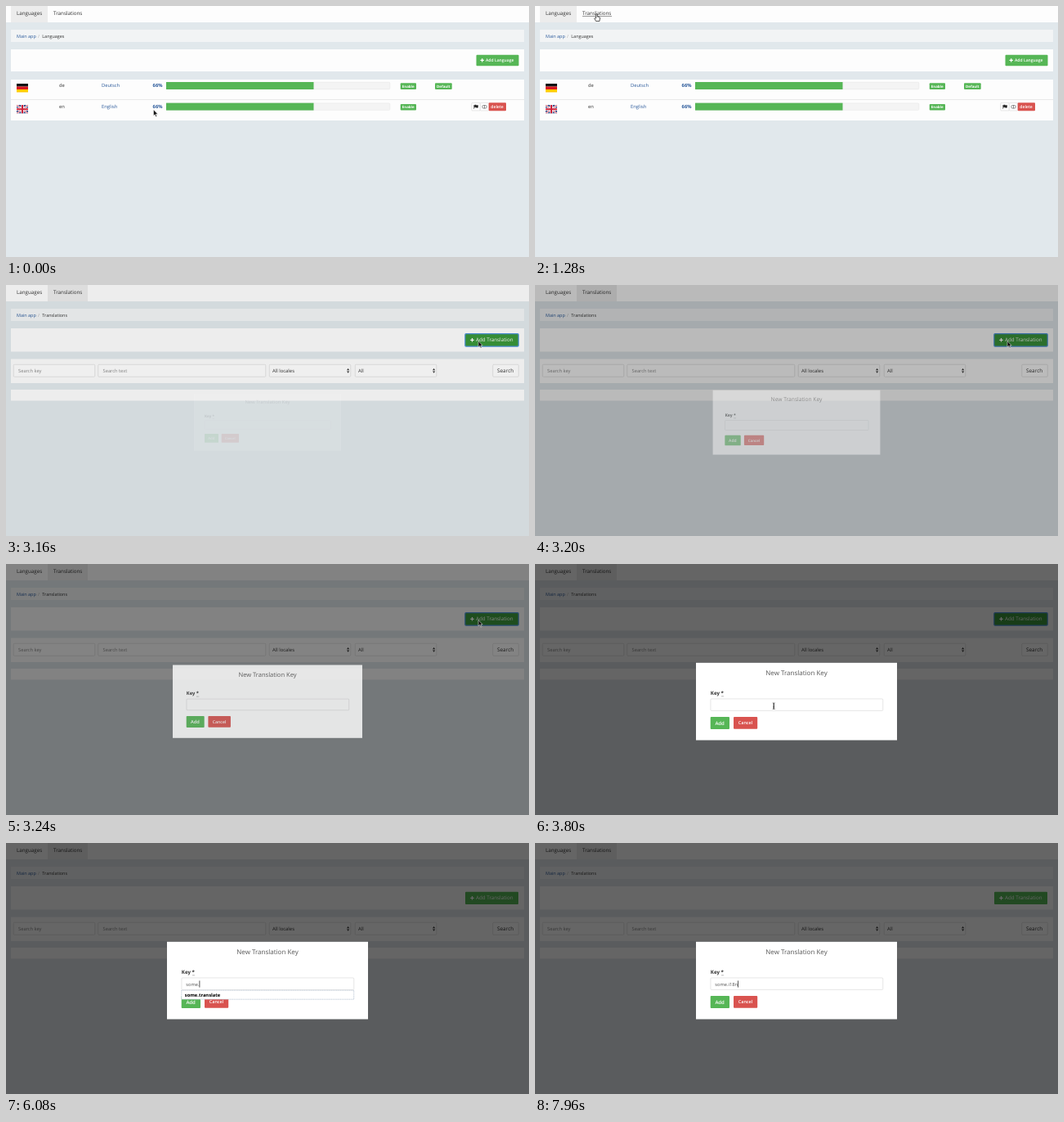
Animation of 640 by 307 pixels, one loop 8000 ms. Source, as an HTML page:

```html
<!DOCTYPE html>
<html lang="en">
<head>
<meta charset="utf-8">
<title>Translation manager</title>
<style>
  html, body { margin: 0; width: 100%; height: 100%; overflow: hidden; background: #e1e8ec; }
  svg { display: block; width: 100%; height: 100%; }
  text { font-family: "Open Sans", sans-serif; text-rendering: geometricPrecision; white-space: pre; }
</style>
</head>
<body>
<svg id="stage" viewBox="0 0 640 307"></svg>
<script>
const LOOP = 8000;
const GREEN = '#56b656', RED = '#d9534f', LINK = '#2b5a9b', INK = '#333';

// Markup helpers
const rect = (x, y, w, h, fill, extra = '') =>
  `<rect x="${x}" y="${y}" width="${w}" height="${h}" fill="${fill}" ${extra}/>`;
const text = (x, y, size, value, fill = INK, weight = 400, extra = '') =>
  `<text x="${x}" y="${y}" font-size="${size}" fill="${fill}" font-weight="${weight}" ${extra}>${value}</text>`;
const path = (d, fill, extra = '') => `<path d="${d}" fill="${fill}" ${extra}/>`;
const group = (id, content, extra = '') => `<g id="${id}" ${extra}>${content}</g>`;
const box = (x, y, w, h, fill = '#fff', border = '#ccc') =>
  rect(x + .25, y + .25, w - .5, h - .5, fill, `rx="1" stroke="${border}" stroke-width=".5"`);
const panel = (y, h, fill = '#fdfdfd') => rect(6, y, 628, h, fill);
const plus = (x, y) => path(`M${x} ${y}h4.4M${x + 2.2} ${y - 2.2}v4.4`, 'none', 'stroke="#fff" stroke-width="1.3"');

function header(activeX, activeWidth, title) {
  return rect(0, 0, 640, 20, '#fdfdfd') +
    rect(activeX, 0, activeWidth, 20, '#ececec') +
    text(13, 11.2, 6.25, 'Languages') +
    text(58, 11.2, 6.25, 'Translations') +
    panel(29, 15, '#f2f4f5') +
    text(13, 38.5, 5.45, 'Main app', LINK) +
    text(39, 38.5, 5.45, '/', '#aaa') +
    text(44.3, 38.5, 5.45, title);
}

const germanFlag = ['#111', '#d8171e', '#fc0']
  .map((color, i) => rect(13, 95 + i * 3.5, 14, 3.5, color)).join('');

const britishFlag = `<svg x="13" y="121" width="14" height="10.5" viewBox="0 0 14 10.5">` +
  rect(0, 0, 14, 10.5, '#1f3a7d') +
  path('M0 0L14 10.5M14 0L0 10.5', 'none', 'stroke="#fff" stroke-width="2.2"') +
  path('M0 0L14 10.5M14 0L0 10.5', 'none', 'stroke="#cf2138" stroke-width=".8"') +
  path('M7 0V10.5M0 5.25H14', 'none', 'stroke="#fff" stroke-width="3.4"') +
  path('M7 0V10.5M0 5.25H14', 'none', 'stroke="#cf2138" stroke-width="2"') + '</svg>';

const badge = (x, y, w, label) =>
  rect(x, y, w, 7.6, GREEN, 'rx="1"') + text(x + 2.1, y + 5.4, 4.4, label, '#fff', 700);

function languageRow(y, code, name) {
  return text(65, y + 6.2, 5.8, code) +
    text(117, y + 6.2, 5.8, name, LINK) +
    text(179.6, y + 6.2, 5.8, '66%', LINK, 700) +
    box(196, y, 274, 9, '#f4f4f4', '#e2e2e2') +
    rect(196, y, 180.5, 9, GREEN) +
    badge(482.7, y + 1.3, 19.3, 'Enable');
}

const rowActions = box(569.5, 118.2, 11, 10) + box(580, 118.2, 11, 10) +
  path('M572.6 121v5M573.2 121.3q1.3-.7 2.3 0t2 0v2.8q-1 .7-2 0t-2.3 0z', '#222', 'stroke="#222" stroke-width=".5"') +
  rect(582.9, 121.5, 5.2, 3.6, 'none', 'rx="1.4" stroke="#444" stroke-width=".6"') +
  path('M585.5 121.5v3.6', 'none', 'stroke="#444" stroke-width=".6"') +
  rect(590.7, 118.2, 21.3, 10, RED, 'rx="1"') +
  text(593.3, 125, 5.1, 'delete', '#fff', 600);

const languagesPage = header(6, 45, 'Languages') +
  group('tabUnderline', rect(58, 12.3, 36, .5, INK)) +
  panel(53, 27) +
  rect(575.5, 59.7, 52, 13.5, GREEN, 'rx="1"') + plus(580.5, 66.4) +
  text(587, 68.4, 5.05, 'Add Language', '#fff', 600) +
  panel(90, 50) + rect(6, 114.2, 628, .6, '#ddd') +
  germanFlag + languageRow(93, 'de', 'Deutsch') + badge(525, 94.3, 20.7, 'Default') +
  britishFlag + languageRow(118.6, 'en', 'English') + rowActions;

const select = (x, label) => box(x, 97, 100, 15.5) + text(x + 4, 107.2, 5.9, label) +
  path(`M${x + 95} 104.2h3.2l-1.6-2.3zM${x + 95} 105.4h3.2l-1.6 2.3z`, INK);
const field = (x, w, label) => box(x, 97, w, 15.5) + text(x + 6, 107.2, 5.75, label, '#888');

const translationsPage = header(51, 49, 'Translations') +
  panel(53, 28.5) +
  rect(562, 59.8, 65, 15.2, GREEN, 'id="addButton" rx="1"') +
  rect(561.8, 59.6, 65.4, 15.6, 'none', 'id="focusRing" rx="1.2" stroke="#4f94dc" stroke-width="1.2"') +
  plus(568.3, 67.3) + text(575, 69.4, 6.25, 'Add Translation', '#fff') +
  panel(90.5, 29.5) +
  field(9, 100, 'Search key') + field(112.5, 205.5, 'Search text') +
  select(322, 'All locales') + select(427, 'All') +
  box(595.5, 97, 32, 15.5) + text(601, 107.2, 6.4, 'Search') +
  panel(128, 13.5);

const modal = rect(197, 120.8, 246, 94.7, '#fff') +
  text(320, 136.3, 8, 'New Translation Key', '#555', 400, 'text-anchor="middle"') +
  text(214.8, 160, 6.2, 'Key *', INK, 700) +
  path('M228 161.8h3.3', 'none', 'stroke="#555" stroke-width=".6" stroke-dasharray=".7 .5"') +
  box(214.7, 164.7, 211.3, 15, '#fff', '#ccc') +
  rect(214.7, 187, 23.3, 15, GREEN, 'rx="1"') + text(220.4, 196.6, 6, 'Add', '#fff', 600) +
  rect(243, 187, 29.2, 14.7, RED, 'rx="1"') + text(248.8, 196.3, 5.45, 'Cancel', '#fff', 600) +
  text(220.3, 174.6, 5.7, '', '#555', 400, 'id="entry"') +
  rect(0, 168.4, .7, 8.2, '#111', 'id="caret"') +
  group('suggestion',
    rect(214.8, 180.2, 210.9, 11, '#fff', 'stroke="#9fb0c4" stroke-width=".6" stroke-dasharray="1.5 .7"') +
    text(218.8, 188, 5.75, 'some.translate', '#000', 700));

const outline = 'stroke="#fff" stroke-width=".5"';
const cursors =
  group('arrow', path('M0 0V7.4L1.7 5.9 2.9 8.6 4.1 8.1 2.9 5.5H5.2Z', '#111', outline)) +
  group('hand', path('M-.8 0Q0-.8 .8 0V3L3 3.4Q4.2 3.7 4 5L3.4 8.6H-.9L-2.8 5.2Q-2.4 4.2-.8 5Z', '#fff', 'stroke="#111" stroke-width=".7"')) +
  group('beam', path('M-1.3-3.8Q0-3.8 0-3V3Q0 3.8-1.3 3.8M1.3-3.8Q0-3.8 0-3V3Q0 3.8 1.3 3.8M-.7 1.2H.7', 'none', 'stroke="#222" stroke-width=".7"'));

document.getElementById('stage').innerHTML =
  group('languages', languagesPage) + group('translations', translationsPage) +
  rect(0, 0, 640, 307, '#000', 'id="backdrop"') + group('modal', modal) + group('cursor', cursors);

const el = {};
document.querySelectorAll('[id]').forEach(node => el[node.id] = node);
const show = (node, visible) => node.setAttribute('display', visible ? 'inline' : 'none');

const smooth = (t, start, end) => {
  const p = Math.min(1, Math.max(0, (t - start) / (end - start)));
  return p * p * (3 - 2 * p);
};

const moves = [
  { start: 0, end: 800, to: [75.5, 10] },
  { start: 2360, end: 2960, to: [578, 68.5] },
  { start: 3300, end: 3800, to: [292.2, 173.7] }
];
function cursorAt(t) {
  let [x, y] = [180.5, 126.8];
  for (const { start, end, to } of moves) {
    const p = smooth(t, start, end);
    x += (to[0] - x) * p;
    y += (to[1] - y) * p;
  }
  return [x, y];
}

function typedText(t) {
  const key = 'some.translat';
  if (t < 4640) return '';
  if (t < 4880) return key.slice(0, 1 + Math.floor((t - 4640) / 80));
  if (t < 5480) return key.slice(0, 4 + Math.floor((t - 4880) / 320 * 9));
  if (t < 6680) return key.slice(0, Math.max(5, 12 - Math.floor((t - 5480) / 360 * 7)));
  return 'some.' + 'i18n'.slice(0, 1 + Math.floor((t - 6680) / 60));
}

// The caret stays solid while keys are pressed, then blinks
const keyBursts = [[4040, 4040], [4640, 5200], [5480, 5900], [6680, 6880]];
function caretVisible(t) {
  const burst = keyBursts.filter(([start]) => start <= t).pop();
  return !!burst && (t < burst[1] || Math.floor((t - burst[1]) / 500) % 2 === 0);
}

function render(t) {
  const onTranslations = t >= 1600;
  show(el.languages, !onTranslations);
  show(el.translations, onTranslations);

  const [x, y] = cursorAt(t);
  const overTab = y < 20 && x > 51 && x < 100;
  const overButton = x > 562 && x < 627 && y > 60 && y < 75;
  const overInput = t > 3300 && x > 215 && x < 426 && y > 164 && y < 180;
  el.cursor.setAttribute('transform', `translate(${x} ${y})`);
  show(el.cursor, t < 4640);
  show(el.hand, overTab);
  show(el.beam, overInput);
  show(el.arrow, !overTab && !overInput);
  show(el.tabUnderline, overTab);

  const focused = t >= 3040 && t < 4040;
  show(el.focusRing, focused);
  el.addButton.setAttribute('fill', focused || overButton ? '#3a963a' : GREEN);

  const opened = smooth(t, 3130, 3284);
  const scale = .7 + .3 * opened;
  el.backdrop.setAttribute('opacity', .6 * opened);
  el.modal.setAttribute('opacity', opened);
  el.modal.setAttribute('transform', `translate(320 168) scale(${scale}) translate(-320 -168)`);
  show(el.modal, opened > 0);

  const value = typedText(t);
  el.entry.textContent = value;
  show(el.suggestion, value && 'some.translate'.startsWith(value));
  show(el.caret, caretVisible(t));
  el.caret.setAttribute('x', 220.4 + (value ? el.entry.getComputedTextLength() : 0));
}

const begin = performance.now();
function tick() {
  render((performance.now() - begin) % LOOP);
  requestAnimationFrame(tick);
}
tick();
</script>
</body>
</html>
```
